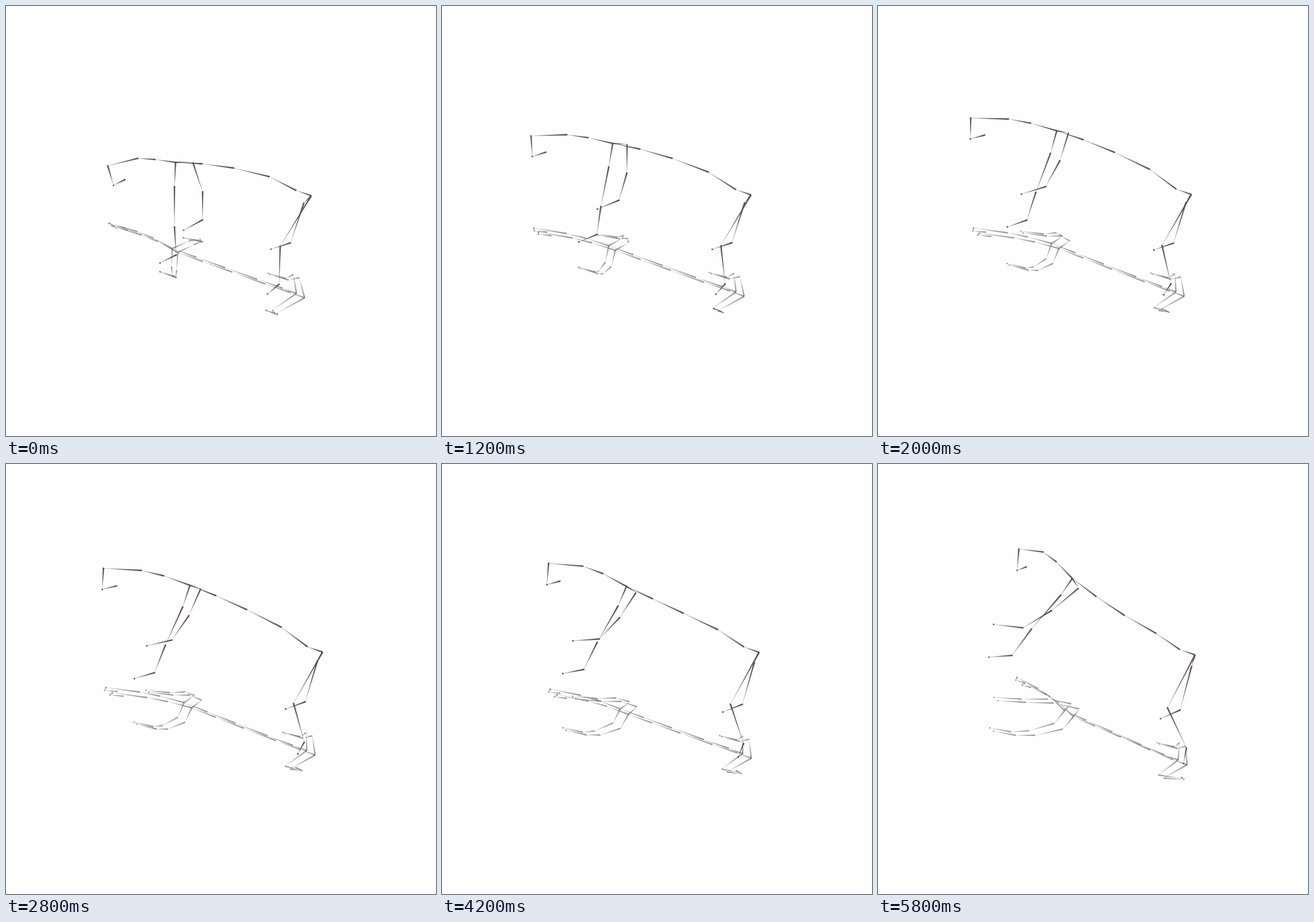
An HTML page with a canvas for the animation above (6 s loop, 748x748 px).

```html
<!DOCTYPE html>
<html lang="en">
<head>
<meta charset="utf-8">
<title>Walking skeleton</title>
<style>
html, body { margin: 0; width: 100%; height: 100%; overflow: hidden; background: #fefefe; }
canvas { display: block; width: 748px; height: 748px; }
</style>
</head>
<body>
<canvas id="stage" width="748" height="748"></canvas>
<script>
const ctx = document.getElementById('stage').getContext('2d');
const SIZE = 748, STEP = 200, STEPS = 30;

const mix = (a, b, t) => a + (b - a) * t;
const smooth = t => t * t * (3 - 2 * t);

// Smooth curve through key values; the keys are step numbers.
const KEYS = [0, 6, 10, 14, 21, 25, 29];
const track = values => step => {
  const slope = i => {
    const a = Math.max(i - 1, 0), b = Math.min(i + 1, KEYS.length - 1);
    return (values[b] - values[a]) / (KEYS[b] - KEYS[a]);
  };
  let i = 0;
  while (i < KEYS.length - 2 && step >= KEYS[i + 1]) i++;
  const h = KEYS[i + 1] - KEYS[i], t = (step - KEYS[i]) / h;
  return mix(values[i], values[i + 1], smooth(t)) +
    h * t * (1 - t) * ((1 - t) * slope(i) - t * slope(i + 1));
};

const withersX = track([295, 297, 311, 320, 321, 325, 338]);
const withersY = track([272, 239, 217, 211, 213, 208, 199]);
const withersGround = track([422, 417, 413, 415, 426, 429, 429]);
const legSwing = track([0, 0.27, 0.5, 0.59, 0.71, 0.82, 1]);

// Bones start at an already placed joint. A joint gives its offset from the
// one before: x, y and ground level, each as a [first, last] pair.
const rig = [
  { ease: 'neck', from: 'withers', joints: {
    neck1: [[-46, -28], [-5, -29], [-11, -24]],
    neck2: [[-39, -23], [-2, -17], [-7, -14]] } },
  { ease: 'head', from: 'neck2', joints: { skull: [[-66, -42], [13, -5], [-8, -20]] } },
  { ease: 'chin', from: 'skull', joints: { chin: [[10, -3], [34, 37], [5, 5]] } },
  { ease: 'head', from: 'chin', joints: { jaw: [[25, 16], [-10, -6], [2, 4]] } },
  { ease: 'leg', from: 'withers', joints: {
    elbowN: [[-2, -20], [42, 29], [31, 22]],
    wristN: [[0, -51], [70, 59], [16, 13]],
    pawN: [[3, -34], [49, 46], [2, 2]],
    toeN: [[-28, -40], [14, 3], [-9, -7]] } },
  { ease: 'leg', from: 'withers', joints: {
    shoulderF: [[30, 11], [0, 17], [-13, -12]],
    elbowF: [[17, -47], [51, 39], [-4, -8]],
    wristF: [[0, -50], [49, 30], [4, 0]],
    toeF: [[-33, -51], [18, -6], [-6, -3]] } },
  { ease: 'leg', from: 'hip', joints: {
    kneeN: [[-54, -48], [88, 92], [29, 26]],
    ankleN: [[-2, 33], [66, 70], [6, 6]],
    hindN: [[-20, -5], [17, 27], [-6, -2]] } },
  { ease: 'leg', from: 'hip', joints: {
    hipF: [[-13, -6], [13, 20], [-33, -30]],
    kneeF: [[-23, -20], [69, 76], [7, 7]],
    hindF: [[-34, -34], [11, 15], [-9, -7]] } }
];
const backParts = { back3: 0.22, back2: 0.482, back1: 0.775 };

const chains = [
  'hip rump back1 back2 back3 withers neck1 neck2 skull chin',
  'jaw chin',
  'withers elbowN wristN pawN toeN',
  'withers shoulderF elbowF wristF toeF',
  'hip kneeN ankleN hindN',
  'hip hipF kneeF hindF'
].map(s => s.split(' '));
const tips = ['chin', 'skull', 'toeN', 'toeF', 'hindN', 'hindF'];
const plain = ['withers', 'rump', 'hip', 'shoulderF'];

// Shadow length, x where it falls straight down, sideways spread.
const lamps = [[1, 216, 0.00048], [1.045, 360, 0.00038]];

function poseAt(step) {
  const u = step / (STEPS - 1);
  const turn = ((u - 0.43) / 0.57) ** 2;
  const settle = 1 - (1 - u) ** 4;
  const lift = u ** 1.5;
  const eases = {
    neck: [turn, u], head: [turn, settle], chin: [settle, settle], leg: [legSwing(step), lift]
  };
  const hip = {
    x: 531 + 20.5 * smooth(Math.min(1, u / 0.55)),
    y: 330 - 7 * u + 9 * u ** 4,
    ground: 500 - 20 * u + 35 * u * u
  };
  const rump = { x: hip.x - 26, y: hip.y - 9, ground: hip.ground - 9 };
  const withers = { x: withersX(step), y: withersY(step), ground: withersGround(step) };
  const pose = { hip, rump, withers };

  const arch = 18 * u * u - 12;
  for (const name in backParts) {
    const v = backParts[name];
    const bow = 4 * v * (1 - v) * arch - 60 * v ** 4 * (1 - v);
    pose[name] = {
      x: mix(withers.x, rump.x, v),
      y: mix(withers.y, rump.y, v) + bow,
      ground: mix(withers.ground, rump.ground, v)
    };
  }

  for (const { ease, from, joints } of rig) {
    const [swing, rise] = eases[ease];
    let p = pose[from];
    for (const name in joints) {
      const [dx, dy, dg] = joints[name];
      p = pose[name] = {
        x: p.x + mix(...dx, swing),
        y: p.y + mix(...dy, rise),
        ground: p.ground + mix(...dg, swing)
      };
    }
  }
  return pose;
}

function cast(pose, [scale, centre, spread]) {
  const out = {};
  for (const name in pose) {
    const p = pose[name], drop = (p.ground - p.y) * scale;
    out[name] = { x: p.x - drop * spread * (p.x - centre), y: p.y + drop };
  }
  return out;
}

// A tapered stroke, dark and wide at a, faint and thin at b.
function bone(a, b, rgb, alpha, wide) {
  const dx = b.x - a.x, dy = b.y - a.y, len = Math.hypot(dx, dy) || 1;
  const nx = -dy / len, ny = dx / len, w = wide / 2, t = 0.3;
  const fill = ctx.createLinearGradient(a.x, a.y, b.x, b.y);
  fill.addColorStop(0, `rgba(${rgb},${alpha})`);
  fill.addColorStop(0.5, `rgba(${rgb},${alpha * 0.85})`);
  fill.addColorStop(1, `rgba(${rgb},${alpha * 0.3})`);
  ctx.fillStyle = fill;
  ctx.beginPath();
  ctx.moveTo(a.x + nx * w, a.y + ny * w);
  ctx.lineTo(b.x + nx * t, b.y + ny * t);
  ctx.lineTo(b.x - nx * t, b.y - ny * t);
  ctx.lineTo(a.x - nx * w, a.y - ny * w);
  ctx.fill();
}

function dot(p, r, color) {
  ctx.fillStyle = color;
  ctx.beginPath();
  ctx.arc(p.x, p.y, r, 0, Math.PI * 2);
  ctx.fill();
}

function skeleton(pose, rgb, alpha, wide) {
  for (const chain of chains)
    for (let i = 1; i < chain.length; i++)
      bone(pose[chain[i - 1]], pose[chain[i]], rgb, alpha, wide);
  for (const name of tips) dot(pose[name], 1.3, `rgba(${rgb},${alpha})`);
}

function draw(step) {
  ctx.fillStyle = '#fefefe';
  ctx.fillRect(0, 0, SIZE, SIZE);
  const pose = poseAt(step);
  ctx.filter = 'blur(0.4px)';
  for (const lamp of lamps) skeleton(cast(pose, lamp), '90,90,90', 0.6, 2.7);
  ctx.filter = 'none';
  skeleton(pose, '80,74,76', 0.95, 2.7);
  const glow = mix(0.6, 0.15, Math.min(1, step / 14));
  for (const name in pose) {
    if (plain.includes(name)) continue;
    dot(pose[name], 1.3, '#5e5256');
    dot(pose[name], 1, `rgba(176,72,96,${glow})`);
  }
}

let shown = -1;
function tick() {
  const step = Math.floor(performance.now() / STEP) % STEPS;
  if (step !== shown) draw(shown = step);
  requestAnimationFrame(tick);
}
tick();
</script>
</body>
</html>
```
